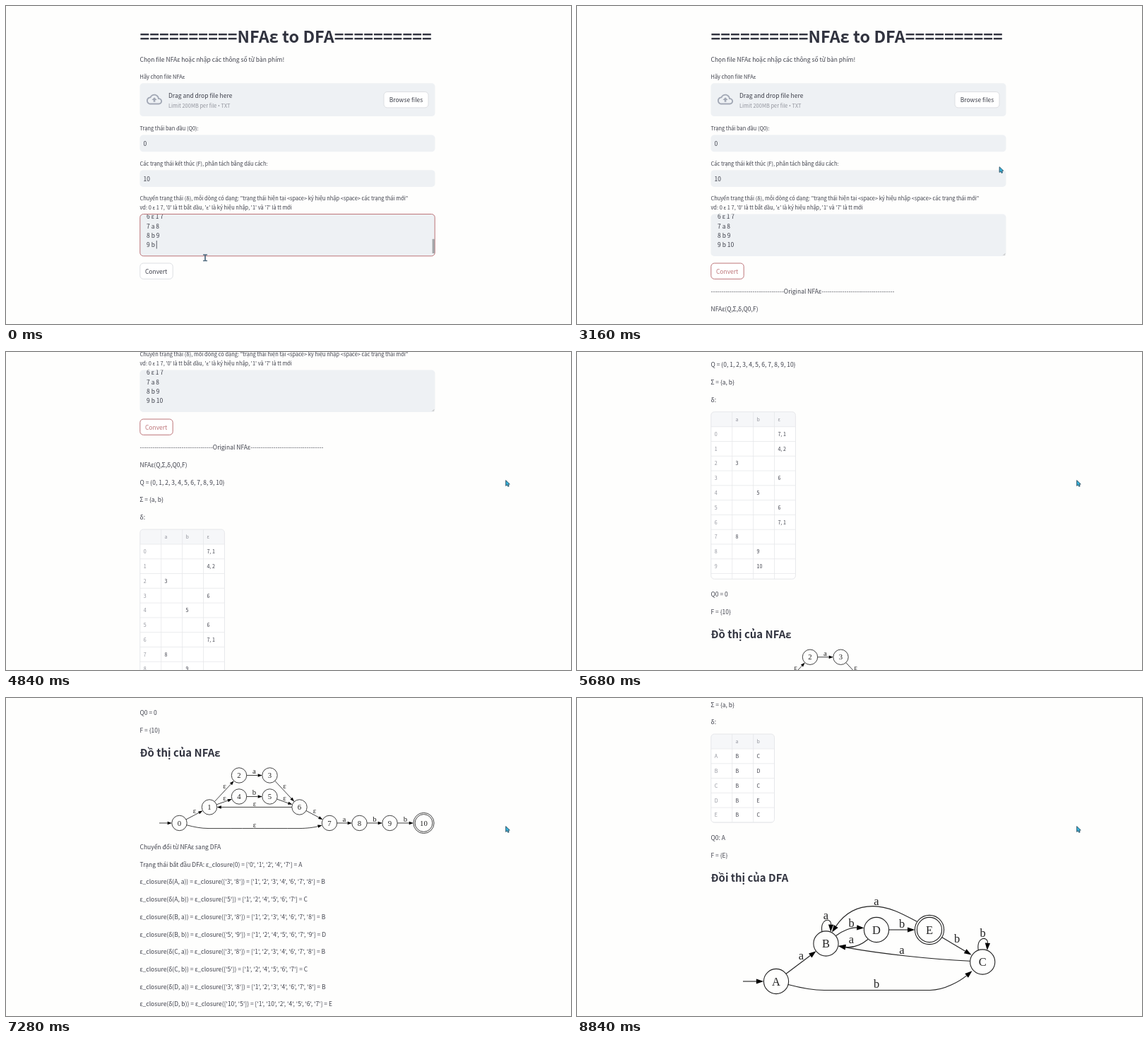
Write an HTML page with a canvas that moves like this. It is 800 px wide and 450 px high and loops after 8.88 s.

```html
<!DOCTYPE html>
<html lang="vi">
<head>
<meta charset="utf-8">
<title>NFAε to DFA</title>
<style>
  html, body { margin: 0; width: 100%; height: 100%; overflow: hidden; background: #fefefd; }
  canvas { display: block; }
</style>
</head>
<body>
<canvas id="stage" width="800" height="450"></canvas>
<script>
const ctx = document.getElementById('stage').getContext('2d');
const LOOP = 8880, STEP = 40;
const INK = '#3c3e49', MUTED = '#92949d', FIELD = '#eef1f4', RED = '#bd7478', LINE = '#e6e7ea', PAPER = '#fefefd';
const SANS = '"Noto Sans CJK JP", "Noto Sans CJK SC", "Noto Sans CJK", "Noto Sans", sans-serif';
const GREEK = '"Noto Sans", "Open Sans", sans-serif';
const SERIF = '"Liberation Serif", serif';
const BODY = 8.51, LABEL = 7.44, SMALL = 6.38, CELL = 7.1, HEAD = 14.9, TITLE = 23.4;
const LEFT = 189.5, WIDTH = 418, LEADING = 24.7;

// Text is set at ten times its size and scaled down so advances stay fractional.
function text(str, x, y, size = BODY, color = INK, weight = 400) {
  ctx.save();
  ctx.translate(x, y);
  ctx.scale(.1, .1);
  ctx.fillStyle = color;
  let pen = 0;
  for (const run of str.split(/([εδΣ•]+)/)) {
    ctx.font = `${weight} ${size * 10}px ${/[εδΣ•]/.test(run) ? GREEK : SANS}`;
    ctx.fillText(run, pen, 0);
    pen += ctx.measureText(run).width;
  }
  ctx.restore();
  return x + pen / 10;
}

function serif(str, x, y, size) {
  ctx.save();
  ctx.translate(x, y);
  ctx.scale(.1, .1);
  ctx.font = `${size * 10}px ${SERIF}`;
  ctx.textAlign = 'center';
  ctx.fillStyle = '#222';
  ctx.fillText(str, 0, 0);
  ctx.restore();
}

function box(x, y, w, h, fill, stroke, radius = 4.7) {
  ctx.beginPath();
  ctx.roundRect(x, y, w, h, radius);
  if (fill) { ctx.fillStyle = fill; ctx.fill(); }
  if (stroke) { ctx.strokeStyle = stroke; ctx.lineWidth = 1; ctx.stroke(); }
}

function segment(x0, y0, x1, y1, color, width = 1) {
  ctx.beginPath();
  ctx.moveTo(x0, y0);
  ctx.lineTo(x1, y1);
  ctx.strokeStyle = color;
  ctx.lineWidth = width;
  ctx.stroke();
}

const paragraphs = (lines, y) => lines.forEach((line, i) => text(line, LEFT, y + i * LEADING));
const ruled = name => '-'.repeat(35) + name + '-'.repeat(35);

// ---------- form ----------
const cloud = new Path2D('M19.35 10.04C18.67 6.59 15.64 4 12 4 9.11 4 6.6 5.64 5.35 8.04 2.34 8.36 0 10.91 0 14c0 3.31 2.69 6 6 6h13c2.76 0 5-2.24 5-5 0-2.64-2.05-4.78-4.65-4.96zM19 18H6c-2.21 0-4-1.79-4-4 0-2.05 1.53-3.76 3.56-3.97l1.07-.11.5-.95C8.08 7.14 9.94 6 12 6c2.62 0 4.88 1.86 5.39 4.43l.3 1.5 1.53.11c1.56.1 2.78 1.41 2.78 2.96 0 1.65-1.35 3-3 3zM8 13h2.55v3h2.9v-3H16l-4-4z');

function drawUploader() {
  box(LEFT, 109.3, WIDTH, 46.8, FIELD);
  ctx.save();
  ctx.translate(199, 121);
  ctx.scale(.92, .92);
  ctx.fillStyle = '#a2a8b5';
  ctx.fill(cloud, 'evenodd');
  ctx.restore();
  text('Drag and drop file here', 230, 129.8);
  text('Limit 200MB per file • TXT', 230, 143.9, LABEL, MUTED);
  box(535, 121.5, 63, 22.4, '#fff', '#dddfe3');
  text('Browse files', 542.7, 135.9);
}

function drawTransitions(t) {
  const y = 294.5, typed = t < 600 ? '' : t < 1080 ? '1' : '10';
  const editing = t < 2680;
  box(LEFT, y, WIDTH, 59.5, FIELD);
  ctx.save();
  ctx.clip();
  let end = 0;
  ['6 ε 1 7', '7 a 8', '8 b 9', '9 b ' + typed].forEach((line, i) => {
    end = text(line, 199, 301.3 + i * 13.3);
  });
  ctx.restore();
  const caretOn = t < 1600 || (t >= 2120 && t < 2400);
  if (caretOn) segment(end + .5, 332, end + .5, 343.5, INK, .8);
  if (editing) {
    box(LEFT + .3, y, WIDTH - .6, 59.3, null, RED);
    if (t >= 600) text('Press Ctrl+Enter to apply', 530, 351, SMALL, MUTED);
  }
  if (t < 1880) {
    box(603.6, 329.8, 3.4, 20.2, '#a5a6a9', null, .5);
  } else {
    segment(603.5, 353, 606.3, 350.2, '#999', .6);
    segment(605.2, 353, 606.3, 351.9, '#999', .6);
  }
}

function drawConvert(t) {
  const pressed = t >= 2400 && t < 2520, hot = t >= 1960;
  box(LEFT + .3, 364, 46.4, 22.3, pressed ? '#d8777a' : '#fff', hot ? RED : '#dddfe3');
  text('Convert', 196.9, 378.8, BODY, pressed ? '#fff' : hot ? RED : INK);
}

function drawForm(t) {
  const bars = '='.repeat(10);
  text(bars + 'NFAε to DFA' + bars, LEFT, 52, TITLE, '#31333f', 700);
  text('Chọn file NFAε hoặc nhập các thông số từ bàn phím!', LEFT, 79);
  text('Hãy chọn file NFAε', LEFT, 102.8, LABEL);
  drawUploader();
  text('Trạng thái ban đầu (Q0):', LEFT, 175.8, LABEL);
  box(LEFT, 182.5, WIDTH, 23.8, FIELD);
  text('0', 194.6, 197.8);
  text('Các trạng thái kết thúc (F), phân tách bằng dấu cách:', LEFT, 225.5, LABEL);
  box(LEFT, 232.2, WIDTH, 23.8, FIELD);
  text('10', 194.6, 247.6);
  text('Chuyển trạng thái (δ), mỗi dòng có dạng: "trạng thái hiện tại <space> ký hiệu nhập <space> các trạng thái mới"', LEFT, 274.8, LABEL);
  text("vd: 0 ε 1 7, '0' là tt bắt đầu, 'ε' là ký hiệu nhập, '1' và '7' là tt mới", LEFT, 288.2, LABEL);
  drawTransitions(t);
  drawConvert(t);
}

// ---------- tables ----------
function drawTable(top, height, heads, rows) {
  const col = 29.9, row = 20.78, w = col * (heads.length + 1);
  box(LEFT, top, w, height, '#fff');
  ctx.save();
  ctx.clip();
  ctx.fillStyle = '#f6f7f9';
  ctx.fillRect(LEFT, top, w, row + .3);
  for (let i = 1; i <= heads.length; i++) segment(LEFT + i * col + .3, top, LEFT + i * col + .3, top + height, LINE, .8);
  for (let i = 1; i <= rows.length + 1; i++) segment(LEFT, top + i * row + .2, LEFT + w, top + i * row + .2, LINE, .8);
  ctx.restore();
  box(LEFT + .3, top, w, height, null, LINE);
  const cell = (str, c, r, color) => text(str, LEFT + c * col + 5.2, top + (r + .5) * row + 3, CELL, color);
  heads.forEach((head, i) => cell(head, i + 1, 0, MUTED));
  rows.forEach((cells, r) => cells.forEach((str, c) => cell(str, c, r + 1, c ? INK : MUTED)));
}

const nfaRows = ['||7, 1', '||4, 2', '3||', '||6', '|5|', '||6', '||7, 1', '8||', '|9|', '|10|']
  .map((row, i) => [String(i), ...row.split('|')]);
const dfaRows = ['ABC', 'BBD', 'CBC', 'DBE', 'EBC'].map(row => [...row]);

// ---------- graphs ----------
function node(name, x, y, r, size, outer) {
  ctx.strokeStyle = '#222';
  ctx.lineWidth = r > 15 ? 1.1 : .85;
  for (const radius of outer ? [r, outer] : [r]) {
    ctx.beginPath();
    ctx.arc(x, y, radius, 0, Math.PI * 2);
    ctx.stroke();
  }
  serif(name, x, y + size * .34, size);
}

// Points: a start, then either one end point or groups of three Bézier points.
function edge(head, ...p) {
  const n = p.length, x = p[n - 2], y = p[n - 1];
  const a = Math.atan2(y - p[n - 3], x - p[n - 4]);
  const bx = x - head * Math.cos(a), by = y - head * Math.sin(a);
  ctx.beginPath();
  ctx.moveTo(p[0], p[1]);
  if (n === 4) ctx.lineTo(bx, by);
  else for (let i = 2; i < n; i += 6) {
    const last = i + 6 >= n;
    ctx.bezierCurveTo(p[i], p[i + 1], p[i + 2], p[i + 3], last ? bx : p[i + 4], last ? by : p[i + 5]);
  }
  ctx.strokeStyle = '#222';
  ctx.lineWidth = head > 8 ? 1.1 : .85;
  ctx.stroke();
  const dx = -Math.sin(a) * head * .35, dy = Math.cos(a) * head * .35;
  ctx.beginPath();
  ctx.moveTo(x, y);
  ctx.lineTo(bx + dx, by + dy);
  ctx.lineTo(bx - dx, by - dy);
  ctx.fillStyle = '#000';
  ctx.fill();
}

function drawNfaGraph() {
  const r = 10.7, size = 10.8, head = 6.2;
  const at = [[245.5, 314], [288, 291.5], [330, 246.5], [373.5, 246.5], [330, 276.5], [373.5, 276.5],
    [415.5, 291.5], [458, 314], [500.5, 314], [543.5, 314], [591.5, 314]];
  const link = (i, j, label, lx, ly) => {
    const [x0, y0] = at[i], [x1, y1] = at[j], a = Math.atan2(y1 - y0, x1 - x0);
    const end = j === 10 ? 14.6 : r;
    edge(head, x0 + r * Math.cos(a), y0 + r * Math.sin(a), x1 - end * Math.cos(a), y1 - end * Math.sin(a));
    serif(label, lx, ly, size);
  };
  edge(head, 217, 314, 234.8, 314);
  link(0, 1, 'ε', 267, 300.5);
  link(1, 2, 'ε', 309.5, 265);
  link(1, 4, 'ε', 309.5, 282);
  link(2, 3, 'a', 351.5, 244.3);
  link(4, 5, 'b', 351.5, 274);
  link(3, 6, 'ε', 394.5, 265);
  link(5, 6, 'ε', 394.5, 282);
  link(6, 1, 'ε', 352, 290);
  link(6, 7, 'ε', 437, 300.5);
  link(7, 8, 'a', 479, 312);
  link(8, 9, 'b', 522, 312);
  link(9, 10, 'b', 565.5, 312);
  edge(head, 255.8, 316.8, 266, 319.5, 276, 321.6, 287, 321.6, 330, 321.6, 370, 321.6, 415, 321.6, 426, 321.6, 437, 320, 447.6, 317);
  serif('ε', 352, 320, size);
  at.forEach(([x, y], i) => node(String(i), x, y, i === 10 ? 12.4 : r, size, i === 10 ? 14.6 : 0));
}

function drawDfaGraph() {
  const r = 17.6, size = 16.5, head = 10.3;
  edge(head, 235, 401, 264.2, 401);
  edge(head, 296, 390.3, 338.5, 358.3);
  edge(head, 366.5, 336.5, 376, 329, 389, 324.5, 406.5, 325.5);
  edge(head, 412, 341.5, 400, 351.5, 389, 353.5, 370, 351);
  edge(head, 441.8, 328, 478.3, 328);
  edge(head, 481.5, 316.5, 461, 305.5, 441, 294.6, 419, 294.6, 391, 294.6, 376, 309, 361, 331.5);
  edge(head, 516.5, 338.5, 558.5, 363.5);
  edge(head, 556.2, 372.3, 500, 369.5, 430, 362, 370, 351);
  edge(head, 299, 405.5, 314, 409.5, 331, 413.5, 350, 413.5, 400, 413.5, 450, 413.5, 500, 413.5, 521, 413.5, 543, 400, 559.5, 386.3);
  edge(head, 347, 331, 343.5, 312, 360, 310, 359.2, 331);
  edge(head, 568.3, 357, 565, 337, 582, 337, 580.8, 357);
  [['a', 317.5, 370], ['b', 388.5, 324], ['a', 388.5, 347], ['b', 460, 325], ['a', 424, 293], ['b', 538, 346],
    ['a', 460, 362], ['b', 424, 410], ['a', 352.5, 312.5], ['b', 574.5, 338]].forEach(l => serif(...l, size));
  [['A', 282, 401], ['B', 352.5, 347.5], ['D', 424, 328], ['E', 499, 328], ['C', 574.2, 373.5]]
    .forEach(n => node(...n, r, size, n[0] === 'E' ? 20.6 : 0));
}

// ---------- results ----------
const closures = [
  ['A', 'a', '38', 'B'], ['A', 'b', '5', 'C'], ['B', 'a', '38', 'B'], ['B', 'b', '59', 'D'], ['C', 'a', '38', 'B'],
  ['C', 'b', '5', 'C'], ['D', 'a', '38', 'B'], ['D', 'b', 'X5', 'E'], ['E', 'a', '38', 'B'], ['E', 'b', '5', 'C']];
const members = { B: '1234678', C: '124567', D: '1245679', E: '1X24567' };
const listed = set => '[' + [...set].map(s => `'${s === 'X' ? 10 : s}'`).join(', ') + ']';
const steps = closures.map(([from, sym, move, to]) =>
  `ε_closure(δ(${from}, ${sym})) = ε_closure(${listed(move)}) = ${listed(members[to])} = ${to}`);

function shifted(y, draw) {
  ctx.save();
  ctx.translate(0, y);
  draw();
  ctx.restore();
}

function drawResults() {
  paragraphs([ruled('Original NFAε'), 'NFAε(Q,Σ,δ,Q0,F)', 'Q = {0, 1, 2, 3, 4, 5, 6, 7, 8, 9, 10}', 'Σ = {a, b}', 'δ:'], 407.1);
  drawTable(520, 236.5, ['a', 'b', 'ε'], nfaRows);
  paragraphs(['Q0 = 0', 'F = {10}'], 781.6);
  text('Đồ thị của NFAε', LEFT, 840.2, HEAD, '#31333f', 600);
  shifted(620.5, drawNfaGraph);
  paragraphs(['Chuyển đổi từ NFAε sang DFA', `Trạng thái bắt đầu DFA: ε_closure(0) = ${listed('01247')} = A`, ...steps,
    ruled('Converted DFA'), 'DFA(Q,Σ,δ,Q0,F)', 'Q = {A, B, C, D, E}', 'Σ = {a, b}', 'δ:'], 971.6);
  drawTable(1380.5, 125.2, ['a', 'b'], dfaRows);
  paragraphs(['Q0: A', 'F = {E}'], 1530.8);
  text('Đồi thị của DFA', LEFT, 1589.6, HEAD, '#31333f', 600);
  shifted(1329.5, drawDfaGraph);
}

// ---------- motion ----------
const scrollKeys = [[4040, 0], [4280, 70.5], [4840, 269], [5320, 416], [5520, 416], [6240, 620.5],
  [6400, 653], [6800, 653], [7840, 978.5], [8840, 1329.5]];

const rate = i => {
  const a = scrollKeys[i], b = scrollKeys[i + 1];
  return a && b ? (b[1] - a[1]) / (b[0] - a[0]) : 0;
};
const slope = i => {
  const a = rate(i - 1), b = rate(i);
  return a * b > 0 ? 2 * a * b / (a + b) : 0;
};

function scrollAt(t) {
  const i = scrollKeys.findIndex(k => k[0] > t) - 1;
  if (i === -1) return 0;
  if (i < 0) return scrollKeys[scrollKeys.length - 1][1];
  const [t0, s0] = scrollKeys[i], [t1, s1] = scrollKeys[i + 1];
  const d = t1 - t0, u = (t - t0) / d, v = 1 - u;
  return s0 * (1 + 2 * u) * v * v + s1 * u * u * (3 - 2 * u) + d * u * v * (slope(i) * v - slope(i + 1) * u);
}

function ease(t, t0, t1) {
  const u = Math.min(1, Math.max(0, (t - t0) / (t1 - t0)));
  return u * u * (3 - 2 * u);
}

function drawPointer(t) {
  if (t < 1840) {
    const color = '#4d687c';
    segment(282, 352, 282, 360.5, color, 1.7);
    segment(279, 352, 285, 352, color, 1.4);
    segment(279, 360.5, 285, 360.5, color, 1.4);
    return;
  }
  const toButton = ease(t, 1760, 2160), away = ease(t, 2640, 3400);
  let x = 282 - 70 * toButton + 505 * away, y = 356 + 20 * toButton - 195 * away;
  if (t >= 3720) x = 713;
  if (t >= 4080) x = 707.3;
  ctx.save();
  ctx.translate(x, y);
  ctx.beginPath();
  ctx.moveTo(.4, .6);
  [[.4, 8.4], [2.2, 6.9], [3.5, 9.4], [4.9, 8.7], [3.8, 6.3], [6, 6]].forEach(p => ctx.lineTo(...p));
  ctx.closePath();
  ctx.fillStyle = '#35b4dc';
  ctx.fill();
  ctx.strokeStyle = '#2b4a5c';
  ctx.lineWidth = .9;
  ctx.stroke();
  ctx.restore();
}

function render(now) {
  const t = Math.floor(now % LOOP / STEP) * STEP;
  ctx.fillStyle = PAPER;
  ctx.fillRect(0, 0, 800, 450);
  shifted(-scrollAt(t), () => {
    drawForm(t);
    if (t >= 2680) drawResults();
  });
  drawPointer(t);
}

const start = performance.now();
function tick() {
  render(performance.now() - start);
  requestAnimationFrame(tick);
}
tick();
</script>
</body>
</html>
```
